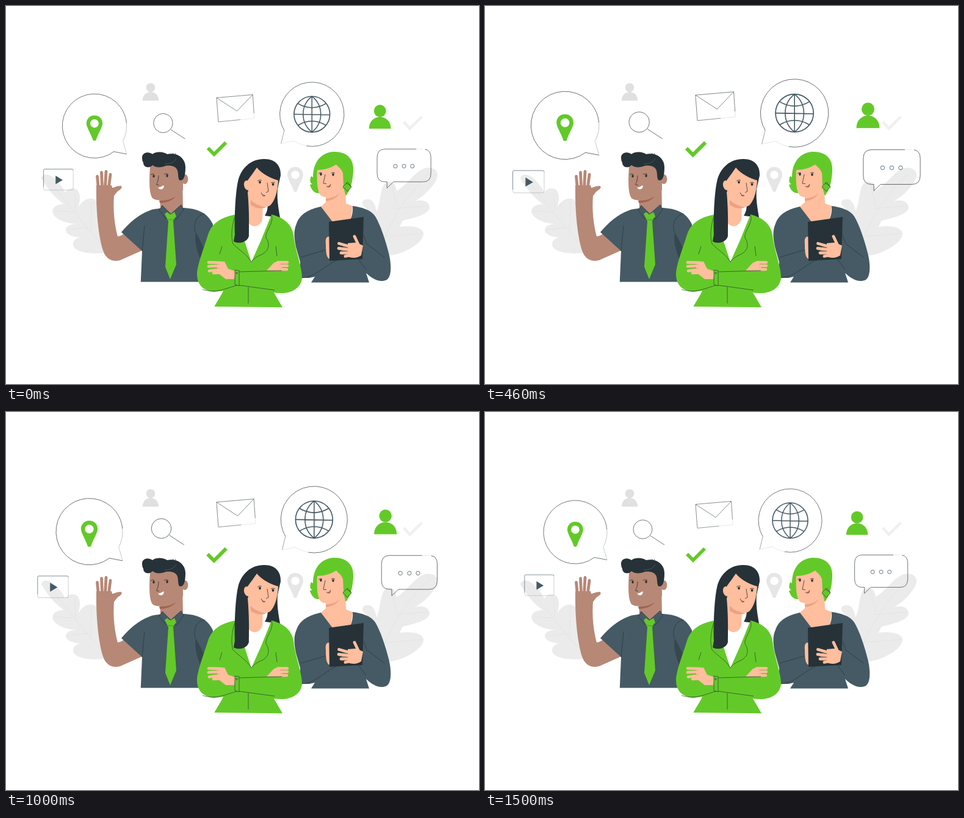
Recreate the animation shown at these times as an HTML page with a canvas. Size 775 by 620 pixels, loop 1.54 s.

```html
<!DOCTYPE html>
<html lang="en">
<head>
<meta charset="utf-8">
<title>Team with pulsing icons</title>
<style>
html, body { margin: 0; width: 100%; height: 100%; overflow: hidden; background: #fff; }
canvas { display: block; width: 775px; height: 620px; }
</style>
</head>
<body>
<canvas id="stage" width="775" height="620"></canvas>
<script>
const ctx = document.getElementById('stage').getContext('2d');
const LOOP = 1540, FRAMES = 37;
const GREEN = '#63c928', DARK = '#263238', SLATE = '#455a64', SHADE = '#37474f';
const BROWN = '#b78876', PEACH = '#ffbe9d', LEAF = '#ebebeb', VEIN = '#e1e1e1', FAINT = '#dedede';

function fill(d, color) {
  ctx.fillStyle = color;
  ctx.fill(new Path2D(d));
}

function line(d, color = DARK, width = 0.65) {
  ctx.strokeStyle = color;
  ctx.lineWidth = width;
  ctx.stroke(new Path2D(d));
}

function oval(x, y, rx, ry, color, tilt = 0) {
  ctx.beginPath();
  ctx.ellipse(x, y, rx, ry, tilt, 0, Math.PI * 2);
  ctx.fillStyle = color;
  ctx.fill();
}

function arc(x, y, r, from = 0, to = 360, color = DARK, width = 0.65) {
  ctx.beginPath();
  ctx.arc(x, y, r, from * Math.PI / 180, to * Math.PI / 180);
  ctx.strokeStyle = color;
  ctx.lineWidth = width;
  ctx.stroke();
}

function fingers(d, color, width) {
  ctx.lineCap = 'round';
  line(d, color, width);
  ctx.lineCap = 'butt';
}

// Draws a shape around a local origin.
function at(x, y, scale, draw) {
  ctx.save();
  ctx.translate(x, y);
  ctx.scale(scale, scale);
  draw();
  ctx.restore();
}

// Icon shapes, centred on 0,0
function pin(color) {
  fill('M0 -17C8 -17 13 -11 13 -4C13 2 5 14 2.5 23Q0 25 -2.5 23C-5 14 -13 2 -13 -4C-13 -11 -8 -17 0 -17Z', color);
  oval(0, -4, 6.8, 6.8, '#fff');
}

function person(color) {
  oval(0, -9.3, 9.8, 10, color);
  fill('M-17.7 19.5C-17.7 7 -9 .5 0 .5C9 .5 17.7 7 17.7 19.5Z', color);
}

function pinBubble() {
  arc(0, 0, 52, 53, 355);
  arc(0, 0, 52, -5, 27, '#9aa0a3', 0.6);
  line('M31 41.5L52 45.5');
  line('M52 45.5L46 24', '#a5a9ab', 0.6);
  pin(GREEN);
}

function globeBubble() {
  arc(0, 0, 52, 149, 460);
  arc(0, 0, 52, 100, 124, FAINT);
  line('M-45 27L-50 47.5', '#70797d');
  line('M-50 47.5L-29 43', FAINT);
  arc(0, 0, 29, 0, 360, SLATE, 1.6);
  line('M0 -29V29M-29 0L29 1M0 -29C-19 -14 -19 14 0 29C19 14 19 -14 0 -29M-23 -17.5Q0 -4 23 -17.5M-23 18Q0 4 23 18', SLATE, 1.5);
}

function chat() {
  line('M34 -26.2Q43.5 -25 43.5 -13V13Q43.5 26.5 31 26.5H-17L-27.5 36.5V26.5H-31Q-43.5 26.5 -43.5 13V-13Q-43.5 -26.5 -31 -26.5H20');
  line('M20 -26.5H31', FAINT, 0.6);
  for (const x of [-14, 0, 13.5]) arc(x, 1.2, 3, 0, 360, SLATE, 0.8);
}

function video() {
  line('M-24 12V-15Q-24 -17 -22 -17H22Q24 -17 24 -15', SLATE);
  line('M24 -15V15Q24 17 22 17H-22Q-24 17 -24 12', '#a9b3b8', 0.6);
  fill('M-4.5 -6.5L7 .7L-4.5 7.5Z', SLATE);
}

function envelope() {
  line('M-27.5 22L-30.5 -17L28 -22L30 8', '#4a5458');
  line('M30 8L30.5 16.5L8 18.5', FAINT);
  line('M8 18.5L-27.5 22', '#5d666a');
  line('M-30.5 -17L2.5 4.5L28 -22', '#4a5458');
}

function magnifier() {
  arc(0, 0, 15.5);
  line('M12.5 10.5L35.5 25.5');
}

const tick = () => line('M-14 -1L-4 9L15 -10', GREEN, 5.6);

function contact() {
  ctx.fillStyle = '#fff';
  ctx.fillRect(-19, -21, 41, 44);
  person(GREEN);
}

// shape, resting x and y, shift at full size
const ICONS = [
  [contact, 609.5, 182, 26, -4],
  [pinBubble, 148, 197, -24.5, -1.7],
  [globeBubble, 500, 178, 10.3, -3.4],
  [chat, 649, 261, 25.3, 4.5],
  [video, 89, 284, -25.7, 6],
  [envelope, 375.5, 168.5, 2.9, -6],
  [magnifier, 258.5, 192.5, -8.5, -3],
  [tick, 345, 234, 0, 0.7],
];

function backdrop() {
  fill('M58 283C58 276 68 274 76 280C86 288 93 297 97 306C101 299 110 297 116 301C123 307 122 318 118 331C124 319 137 312 146 318L160 330V405C140 407 115 405 110 393C109 384 117 379 126 380C114 380 98 376 98 367C99 359 108 358 116 357C100 358 77 349 76 337C77 327 87 325 95 325C82 316 70 303 58 283Z', LEAF);
  line('M68 285C100 320 130 365 160 393M113 306L114 337M80 336L113 338M101 367L134 363M140 320L139 369', VEIN);
  fill('M590 332C577 322 587 314 598 318C604 322 606 330 607 337C614 325 612 303 620 292C627 285 638 287 640 303C655 296 669 272 686 266C704 262 711 275 705 285C698 300 680 315 670 320C680 317 694 319 694 331C692 343 665 348 650 352C648 355 646 360 645 362C660 360 684 361 684 374C683 390 650 407 630 409H600Z', LEAF);
  line('M695 274C660 305 630 350 612 400M632 293L640 328M692 328L638 332M683 373L620 378', VEIN);
  at(237, 140.7, 0.74, () => person('#e0e0e0'));
  at(474, 281, 1, () => pin('#e6e6e6'));
  line('M652 190L661.5 201L681.5 181.5', '#f0f0f0', 4.5);
}

function man() {
  fill('M148 294H173L177 311C175 335 178 360 183 378Q190 377 198 370L223 401L187 417C175 420 164 416 159 401C152 380 148 340 148 308Z', BROWN);
  fingers('M149.5 279.5L151.5 300M156.5 273L157.5 298M164 271.5L162.5 298M171 276.5L168 300', BROWN, 4.8);
  fill('M168 298C176 300 179 295 188 295C192 297 188 301 184 303C180 306 179 310 176 312L168 314Z', BROWN);

  fill('M189 371C202 355 218 342 234 336C242 332 250 333 256 331H290C312 332 330 338 339 358V452.4H220.8L223 402Z', SLATE);
  fill('M311 371C308 385 313 403 319 416L324 396Z', SHADE);
  line('M227 360L223 402M310 371C306 354 314 342 326 341');

  fill('M252 312L253 331C257 343 267 346 273 341L290 330L289 285Z', BROWN);
  oval(293, 284, 5.3, 8, BROWN);
  fill('M236 264C234 292 235 311 241 316C254 323 278 315 290 302V258L243 256Z', BROWN);
  fill('M251 319C261 320 271 317 278 312C273 319 263 323 252 323Z', '#a0634f');
  fill('M223 250C222 241 232 237 240 243C247 238 258 239 264 243C281 239 294 250 294 264C294 277 292 285 287 286C281 287 283 278 281 270C279 263 271 261 262 262C255 265 246 266 240 261C235 267 225 265 225 257Q223 254 223 250Z', DARK);
  line('M273 246L274 241M276 246L278 241');
  line('M260 259C269 259 275 257 279 250', '#68747a', 0.5);
  oval(242, 279, 1.7, 2.3, DARK);
  oval(264, 278.5, 1.7, 2.3, DARK);
  line('M237 277Q240 274 243 276M259 276Q263 274 266 276M250 278C250 285 248 290 246.5 293L251 294', DARK, 0.8);
  fill('M249 298Q254 297 258.5 294C259.5 301 253 302.5 249 298Z', '#fff');

  for (const d of ['M256 327L251 335L262 349L270 341Z', 'M287 326L291 334L279 350L270 341Z']) {
    fill(d, SLATE);
    line(d);
  }
  fill('M260 341L264 338L269 342L276 338L279 345L275 350L274 353L279 424L269 448L261 428L266 353Z', GREEN);
  line('M265 350L275 351', '#408d1a', 0.7);
}

function reader() {
  fill('M512 307C505 307 500 301 498 293L502 292C497 290 498 284 500 279L503 281C503 262 511 241 537 239C560 239 570 252 569 270C568 288 565 301 557 311L545 295Z', GREEN);
  fill('M524 312V322L516 329L533 354L565 350L568 328L557 324L556 298Z', PEACH);
  fill('M510 269C509 289 510 305 516 311C527 318 546 311 553 297L557 282C552 269 547 266 541 260C532 266 520 269 510 269Z', PEACH);
  fill('M524 316Q538 315 547 307Q540 318 525 320Z', '#eba283');
  fill('M552 274C553 285 552 300 557 311C566 297 569 280 568 268L546 261Z', GREEN);
  fill('M552 296L560 289L566 297L559 304Z', GREEN);
  line('M552 296L560 289L566 297L559 304ZM557 290L566 296');
  oval(516, 276, 1.7, 2.3, DARK);
  oval(536, 276.5, 1.7, 2.3, DARK);
  line('M512 275Q515 272 518 274M533 274Q536 272 539 274M523 276L520 291L525 291.5M525 296Q530 297 532 292', DARK, 0.8);
  fill('M526 297Q530 297 532 293Q532 299 526 297Z', '#a64f3f');

  fill('M516 329C498 333 482 340 476 357C470 370 473 384 475 395L482 420V446H497L506 444L500 453.6H595L590 438C600 447 612 455 624 449C633 443 631 420 627 405C622 385 614 360 605 345C598 334 582 330 568 328Q569 341 564 351L535 354Z', SLATE);
  line('M483 412L524 400M586 376L591 390L620 412M484 446C509 444 521 426 544 416M577 415L590 432');
  fill('M532 379C525 376 523 382 524 390C524 405 525 414 531 415Z', PEACH);
  fill('M529 354L586 346L584 415L530 418Z', DARK);
  fill('M560 389L574 388L585 393L582 409Q572 416 560 411Z', PEACH);
  fingers('M565 395L545.5 389.5M565 400L545 397.5M565 405L549 405M568 408L556 410.5M579 395L571 378', PEACH, 4.8);
  line('M562 397L552 394.5M561 402L550 401.5M561 407L553 407', '#c98870', 0.6);
}

function leader() {
  fill('M380 340L435 340L421 385L402 424L386 385Z', '#fff');
  fill('M420 300C432 320 430 335 424 344L449 347C445 325 442 305 448 282Z', DARK);
  fill('M396 305V352C400 365 416 364 420 350L421 322Z', PEACH);
  fill('M376 342C355 346 338 354 331 375C325 395 313 425 313 440C313 457 323 467 341 469L356 467C352 476 345 486 341.5 493L453 494.3L439 470C461 474 482 467 485 447C486 430 474 402 471 375C468 356 452 346 435 342L418 384L402 420L391 386Z', GREEN);
  line('M435 343C440 355 424 370 426 380C434 393 429 402 420 407C411 411 406 414 402 420C395 407 381 400 372 390C368 380 370 357 376 343M350 407L354 394M444 410L442 394M397 461V488');

  fill('M375 375C374 345 376 306 380 288C385 265 402 251 422 251C441 250 451 262 450 278L445 300L396 305C399 340 398 365 398 377C396 388 380 391 373 386Z', DARK);
  oval(395, 294, 5, 8, PEACH, -0.2);
  fill('M396 286C401 279 407 271 411 265C420 276 435 283 446 286C445 306 440 320 433 327C421 334 405 327 397 311Z', PEACH);
  fill('M401 318C408 325 417 329 427 330C418 334 407 331 401 326Z', '#eba283');
  oval(416, 289, 1.8, 2.3, DARK);
  oval(437.5, 292.5, 1.8, 2.3, DARK);
  line('M412 287Q416 284 419 286M434 290Q438 288 441 290M428 290L430 304L426 306M418 306Q420 311 425 311', DARK, 0.8);
  fill('M418 307Q420 312 425 311Q421 315 418 307Z', '#a64f3f');

  fill('M346 420L358 419L364 431L376 435L374 448H360L346 437Z', PEACH);
  fingers('M352 421L332 420.5M350 426L332 427M351 432L333 434.5M355 437L340 438', PEACH, 4.6);
  fill('M425 436L439 421L448 418L455 434Z', PEACH);
  fingers('M445 420.5L461 420.5M445 426L461 426M445 432L460 432', PEACH, 4.4);
  line('M350 424L339 424M350 430L339 431M449 423.5L458 423.5M449 429L458 429', '#db8f70', 0.6);
  fill('M375 433L452 434V462L375 458Z', GREEN);
  line('M375 433L382 434V459L375 457ZM382 436L452 434M382 458L440 466M322 465C345 472 360 463 379 458');
  arc(378, 438, 1.3, 0, 360, DARK, 0.6);
}

// Swell of the icons: turning points in ms, linear between them.
const BEATS = [[-40, 0], [283, 1], [850, 0], [1167, 1], [1500, 0], [1823, 1]];

function swell(ms) {
  const i = BEATS.findIndex(([end]) => end > ms);
  const [t0, v0] = BEATS[i - 1], [t1, v1] = BEATS[i];
  return v0 + (v1 - v0) * (ms - t0) / (t1 - t0);
}

function render(now) {
  const step = LOOP / FRAMES;
  const frame = Math.floor((now % LOOP + 5) / step) % FRAMES;
  const u = swell(frame * step);
  ctx.fillStyle = '#fff';
  ctx.fillRect(0, 0, 775, 620);
  backdrop();
  for (const [draw, x, y, dx, dy] of ICONS) at(x + dx * u, y + dy * u, 1 + 0.104 * u, draw);
  man();
  reader();
  leader();
}

const start = performance.now();
function loop() {
  render(performance.now() - start);
  requestAnimationFrame(loop);
}
loop();
</script>
</body>
</html>
```
